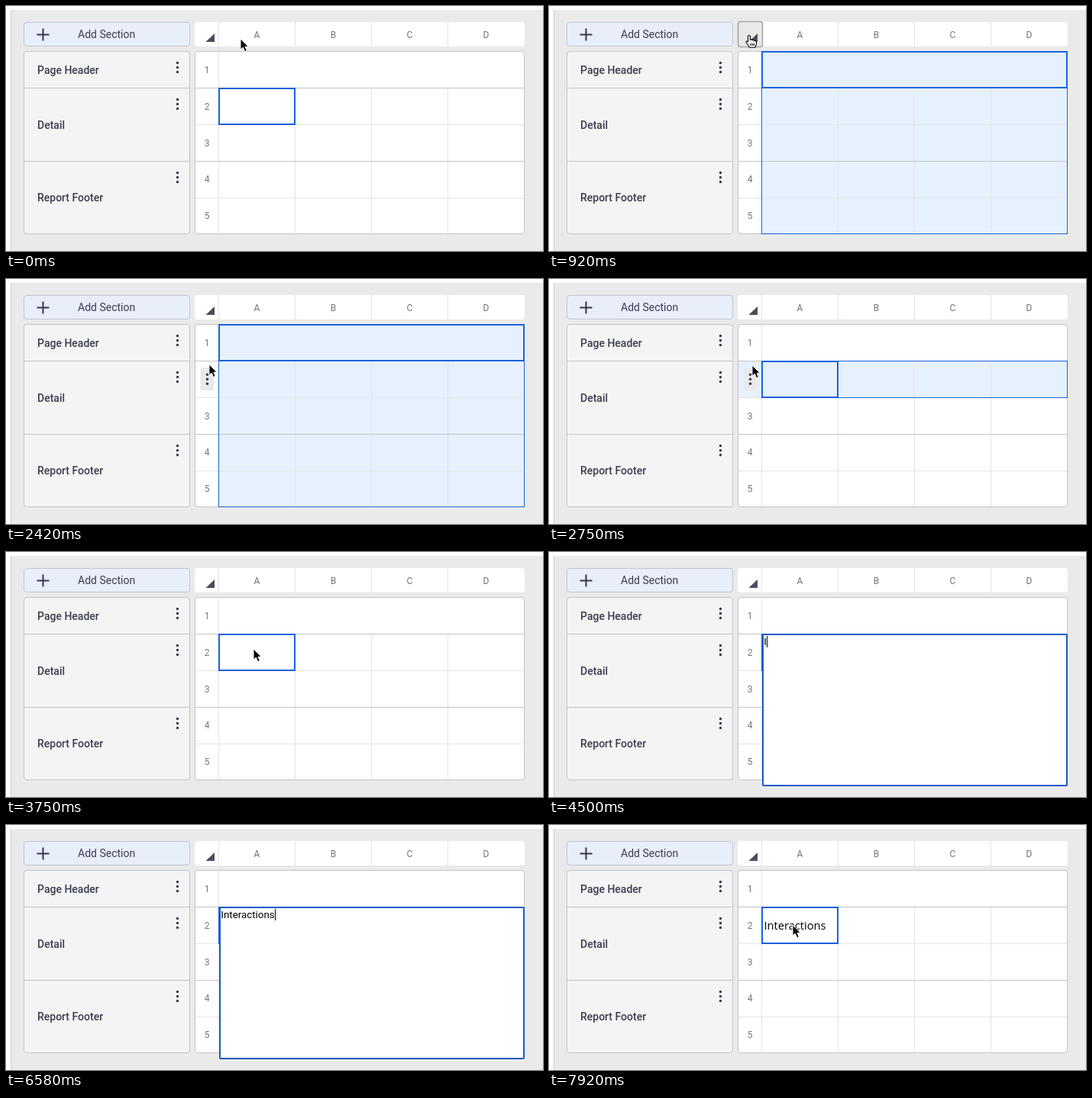
Animation of 703 by 321 pixels, one loop 8 s. Source, as an HTML page:

```html
<!DOCTYPE html>
<html lang="en">
<head>
<meta charset="utf-8">
<title>Report sections grid</title>
<style>
  html, body { margin: 0; width: 100%; height: 100%; overflow: hidden; background: #fff; }
  svg { display: block; width: 703px; height: 321px; }
  text { font-family: Roboto, sans-serif; white-space: pre; }
  .title { font-size: 14px; font-weight: 500; fill: #3a3c4e; }
  .add { font-size: 14px; fill: #3a3c4e; }
  .head { font-size: 12px; fill: #74757d; text-anchor: middle; }
  .light { stroke: #e4e4e6; fill: none; }
  .strong { stroke: #c2c3c8; fill: none; }
  .blue { stroke: #1b62dc; fill: none; }
  .thick { stroke-width: 2; }
  .tint { fill: #e6f1fd; }
</style>
</head>
<body>
<svg viewBox="0 0 703 321" xmlns="http://www.w3.org/2000/svg">
  <defs>
    <g id="dots" fill="#35374a">
      <circle cy="-6" r="1.7"/><circle r="1.7"/><circle cy="6" r="1.7"/>
    </g>
    <clipPath id="body"><rect x="248" y="60" width="430" height="238" rx="3.5"/></clipPath>
  </defs>

  <rect x="6" y="5" width="697" height="316" fill="#eaeaea"/>
  <path d="M6.5 5V321" stroke="#cbcbcd"/>

  <rect x="23.5" y="21.5" width="217" height="31" rx="3.5" fill="#e8eefa" stroke="#c1c5d3"/>
  <path d="M40.5 37.5H56.5M48.5 29.5V45.5" stroke="#35374a" stroke-width="2"/>
  <text class="add" x="94" y="42">Add Section</text>

  <rect x="23.5" y="59.5" width="217" height="239" rx="3.5" fill="#f4f4f5" stroke="#c2c3c8"/>
  <path class="strong" d="M24 107.5H240M24 203.5H240"/>
  <text class="title" x="41" y="89">Page Header</text>
  <text class="title" x="41" y="161">Detail</text>
  <text class="title" x="41" y="256">Report Footer</text>
  <use href="#dots" x="224.5" y="80.5"/>
  <use href="#dots" x="224.5" y="128.5"/>
  <use href="#dots" x="224.5" y="224.5"/>

  <rect x="247" y="21" width="432" height="32" rx="4" fill="#fff"/>
  <path class="light" d="M278.5 21V53M378.5 21V53M478.5 21V53M578.5 21V53"/>
  <rect id="corner" x="247.5" y="20.5" width="32" height="33" rx="3" fill="#e9e9e9" stroke="#a3a3a5" stroke-width="1.5"/>
  <path d="M273 36V47H261.500Z" fill="#4a4c5e"/>

  <rect x="247.5" y="59.5" width="431" height="239" rx="3.5" fill="#fff" stroke="#c2c3c8"/>
  <g clip-path="url(#body)">
    <rect id="allFill" class="tint" x="279" y="60" width="400" height="239"/>
    <rect id="rowFill" class="tint" x="248" y="108" width="431" height="47"/>
    <path class="light" d="M248 155.5H678M248 251.5H678M278.5 60V298M378.5 108V298M478.5 108V298M578.5 108V298"/>
    <path class="strong" d="M248 107.5H678M248 203.5H678"/>
  </g>
  <g id="heads"></g>
  <g id="rowMenu">
    <rect x="-9" y="-15" width="18" height="30" rx="3" fill="#eaeaec"/>
    <use href="#dots"/>
  </g>

  <g id="allLine">
    <rect class="blue" x="278.5" y="59.5" width="400" height="239"/>
    <rect class="blue thick" x="279" y="60" width="399" height="47"/>
  </g>
  <rect id="rowLine" class="blue" x="278.5" y="107.5" width="400" height="48"/>
  <rect id="cell" class="blue thick" x="279" y="108" width="99" height="47"/>
  <text id="value" x="281.5" y="137" style="font: 14.67px 'Open Sans', sans-serif">Interactions</text>

  <g id="editor">
    <rect x="280" y="108" width="398" height="198" rx="1" fill="#fff" stroke="#1a5cc4" stroke-width="2"/>
    <text id="typed" x="281.300" y="122" font-size="13.33"></text>
    <path id="caret" d="M.5 110V125" stroke="#000"/>
  </g>

  <g id="mouse">
    <path id="arrow" d="M0 0V14.200L3.300 11.200L5.700 16.700L8.300 15.600L6 10.300H10.300Z" fill="#000" stroke="#fff" stroke-width="1"/>
    <path id="hand" d="M-1.500 .8C-1.500-.9 1.300-.9 1.400.8V5.600C2 4.500 4 4.600 4.200 6C5 5.100 6.700 5.400 6.900 6.700C8 6 9.500 6.800 9.500 8.200V10.500C9.500 12 8.200 12.800 8 15.200H.2C-.2 12.900-2 11.700-3.400 9.500C-4.900 7.500-3.300 6.100-1.500 7.900ZM2 10V13M4.200 10V13M6.400 10V13" fill="#fff" stroke="#000" stroke-width="1.100" stroke-linejoin="round"/>
    <path id="beam" d="M-2.500 0Q0 0 0 2V14Q0 16 -2.500 16M2.500 0Q0 0 0 2M0 14Q0 16 2.500 16M-1.500 9.500H1.500" fill="none" stroke="#222"/>
  </g>
</svg>
<script>
const LOOP = 8000, STEP = 1000 / 12;
const $ = id => document.getElementById(id);
const show = (id, on) => $(id).style.display = on ? '' : 'none';
const within = (t, from, to) => t >= from && t < to;

// time, x, y of the pointer tip
const PATH = [
  [0, 307, 43], [660, 262, 39], [1660, 262, 39], [2480, 266, 113],
  [2820, 266, 113], [3240, 316, 122], [3490, 324, 127],
  [7400, 324, 127], [7740, 319, 131], [LOOP, 319, 131]
];
// time, number of letters typed
const TYPING = [
  [4490, 1], [4820, 2], [4910, 3], [4990, 5], [5570, 6], [5740, 7],
  [5910, 8], [6070, 9], [6240, 10], [6320, 11], [6410, 12]
];
const ALL = [740, 2570], ROW = [2570, 3240], EDIT = [3910, 6820];
const WORD = 'Interactions';
const rowY = n => 83.5 + 47.8 * n;

function addHead(label, x, y) {
  const el = document.createElementNS('http://www.w3.org/2000/svg', 'text');
  el.setAttribute('class', 'head');
  el.setAttribute('x', x);
  el.setAttribute('y', y);
  el.textContent = label;
  $('heads').append(el);
  return el;
}
[...'ABCD'].forEach((c, i) => addHead(c, 328.5 + 100 * i, 41.5));
const rowHeads = [...'12345'].map((c, i) => addHead(c, 263, rowY(i) + 4.5));

function pointer(t) {
  const i = PATH.findIndex(p => p[0] > t);
  const [t0, x0, y0] = PATH[i - 1], [t1, x1, y1] = PATH[i];
  const k = (t - t0) / (t1 - t0), e = k * k * (3 - 2 * k);
  return [x0 + (x1 - x0) * e, y0 + (y1 - y0) * e];
}

function drawPointer(t, editing) {
  const [x, y] = pointer(t);
  const onCorner = x < 279 && y < 54;
  const row = x < 279 && y >= 60 ? Math.floor((y - 60) / 48) : -1;
  const beam = editing && t < 4490;

  show('mouse', !within(t, 4490, 7400));
  $('mouse').setAttribute('transform', `translate(${x} ${y})`);
  show('hand', onCorner);
  show('beam', beam);
  show('arrow', !onCorner && !beam);
  show('corner', onCorner);

  show('rowMenu', row >= 0);
  $('rowMenu').setAttribute('transform', `translate(263.5 ${rowY(row)})`);
  rowHeads.forEach((el, i) => el.style.display = i === row ? 'none' : '');
}

function draw(t) {
  const all = within(t, ...ALL), row = within(t, ...ROW), editing = within(t, ...EDIT);
  show('allFill', all);
  show('allLine', all);
  show('rowFill', row);
  show('rowLine', row);
  show('cell', !all);
  show('value', t >= EDIT[1]);
  show('editor', editing);
  drawPointer(t, editing);

  if (editing) {
    const count = TYPING.reduce((n, [at, len]) => t >= at ? len : n, 0);
    $('typed').textContent = WORD.slice(0, count);
    const end = count ? $('typed').getComputedTextLength() : 0;
    $('caret').setAttribute('transform', `translate(${Math.round(281.3 + end)} 0)`);
    show('caret', !within(t, 5320, 5570));
  }
}

const start = performance.now();
function tick() {
  const t = (performance.now() - start) % LOOP;
  draw(Math.min(Math.floor((t + 4) / STEP) * STEP, LOOP - 1));
  requestAnimationFrame(tick);
}
tick();
</script>
</body>
</html>
```
